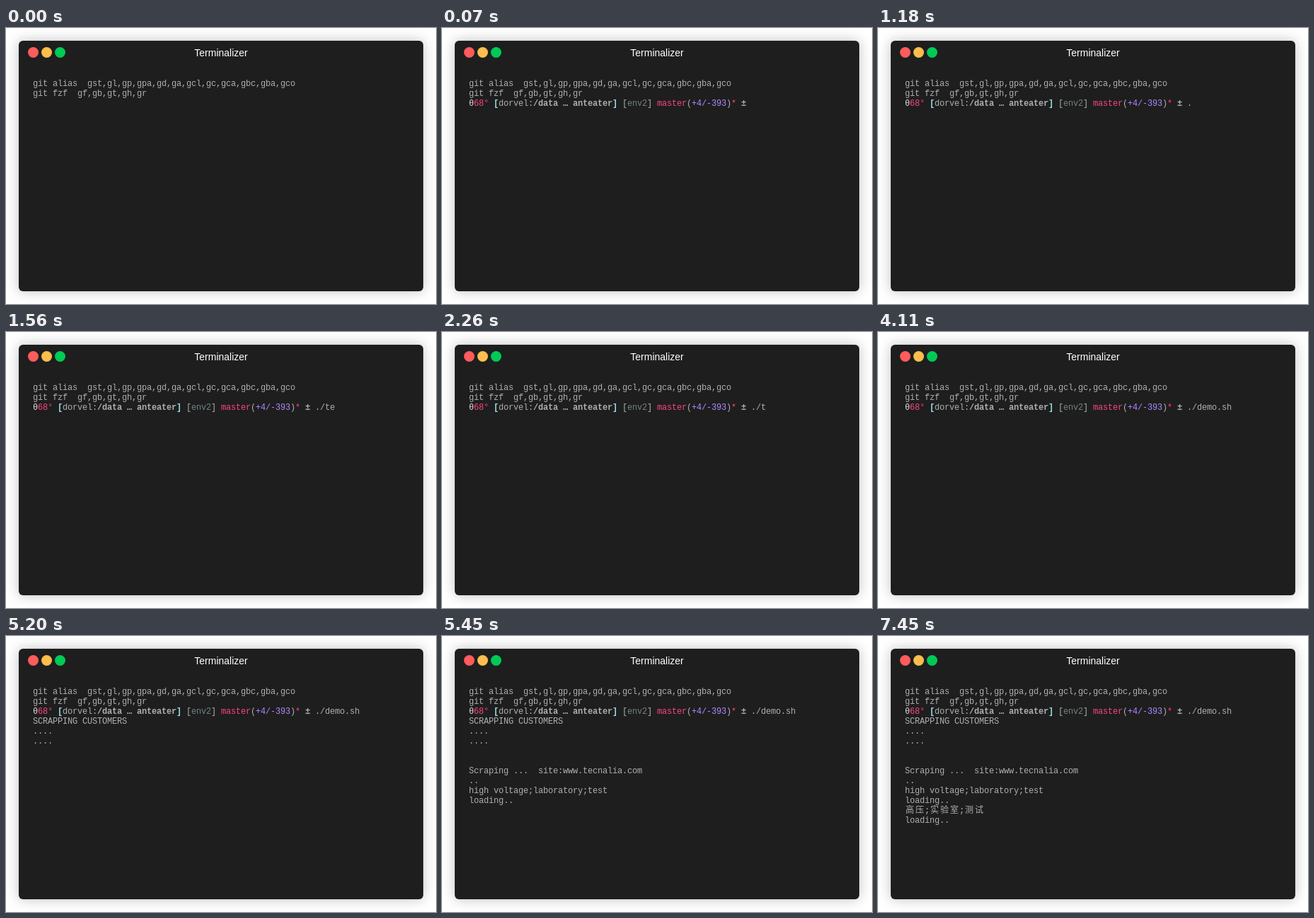
These frames come from a looping animation (608 px wide and 390 px high, 8 s). An HTML page:

```html
<!DOCTYPE html>
<html lang="en">
<head>
<meta charset="utf-8">
<title>Terminal session</title>
<style>
  html, body { margin: 0; width: 100%; height: 100%; overflow: hidden; background: #fff; }
  .window {
    position: absolute; left: 18px; top: 18px; width: 572px; height: 354px;
    border-radius: 6px; background: #1e1e1e; box-shadow: 0 0 18px rgba(0, 0, 0, .25);
  }
  svg { position: absolute; left: 0; top: 0; display: block; }
  text { white-space: pre; }
  .title { font: 14px "Liberation Sans", Arial, sans-serif; fill: #fff; text-anchor: middle; }
  .row { font: 12px "Liberation Mono", "Noto Sans CJK SC", "Noto Sans CJK JP", monospace; fill: #afafaf; }
  .bold { font-weight: bold; }
</style>
</head>
<body>
<div class="window"></div>
<svg width="608" height="390" viewBox="0 0 608 390">
  <circle cx="38.5" cy="34.5" r="7.5" fill="#ff5c5c"/>
  <circle cx="57.5" cy="34.5" r="7.5" fill="#ffbd4c"/>
  <circle cx="76.5" cy="34.5" r="7.5" fill="#00ca56"/>
  <text class="title" x="304" y="40">Terminalizer</text>
  <g id="screen"></g>
</svg>
<script>
const LOOP = 8000, CELL = 7, LINE = 14, LEFT = 38, BASE = 82;
const FG = '#afafaf', RED = '#fc4384', BLUE = '#9adfe8', CYAN = '#708387', PURPLE = '#ae89fe';
const screen = document.getElementById('screen');

// Runs of [text, colour, bold]
const prompt = [
  ['θ', '#d5d5d0'], ['68°', RED], [' '], ['[', BLUE, true], ['dorvel:'],
  ['/data … anteater', FG, true], [']', BLUE, true], [' ['], ['env2', CYAN], ['] '],
  ['master', RED], ['('], ['+4/-393', PURPLE], [')'], ['*', RED], [' '], ['±', FG, true], [' ']
];
const intro = ['git alias  gst,gl,gp,gpa,gd,ga,gcl,gc,gca,gbc,gba,gco', 'git fzf  gf,gb,gt,gh,gr'];
const output = [
  'SCRAPPING CUSTOMERS', '....', '....', '', '',
  'Scraping ...  site:www.tecnalia.com', '..',
  'high voltage;laboratory;test', 'loading..',
  '高压;实验室;测试', 'loading..'
];

// [start, typed command]; null hides the prompt
const typing = [
  [0, null], [70, ''], [1180, '.'], [1280, './'], [1420, './t'], [1560, './te'],
  [2260, './t'], [2490, './'], [2610, './d'], [2780, './de'], [3560, './dem'], [4110, './demo.sh']
];
// [start, number of output lines]
const printing = [[0, 0], [5200, 3], [5450, 9], [7450, 11]];

const valueAt = (steps, t) => steps.filter(([start]) => start <= t).pop()[1];
const cells = ch => ch >= '\u2e80' ? 2 : 1;

function make(tag, attrs, parent) {
  const el = document.createElementNS('http://www.w3.org/2000/svg', tag);
  for (const key in attrs) el.setAttribute(key, attrs[key]);
  return parent.appendChild(el);
}

// Every character sits on the terminal's whole-pixel grid.
function drawRow(runs, index) {
  const y = BASE + index * LINE;
  const row = make('text', { class: 'row', y }, screen);
  let x = LEFT;
  for (const [text, fill = FG, bold] of runs) {
    const xs = [...text].map(ch => {
      const left = x;
      x += cells(ch) * CELL;
      return left + (cells(ch) - 1);
    });
    const span = make('tspan', { x: xs.join(' '), y, fill, class: bold ? 'bold' : '' }, row);
    span.textContent = text;
  }
}

let shown = '';
function render(t) {
  const command = valueAt(typing, t), count = valueAt(printing, t);
  const key = command + '|' + count;
  if (key === shown) return;
  shown = key;
  const rows = intro.map(line => [[line]]);
  if (command !== null) rows.push([...prompt, [command]]);
  output.slice(0, count).forEach(line => rows.push([[line]]));
  screen.replaceChildren();
  rows.forEach(drawRow);
}

const begin = performance.now();
function tick() {
  render((performance.now() - begin) % LOOP);
  requestAnimationFrame(tick);
}
tick();
</script>
</body>
</html>
```
